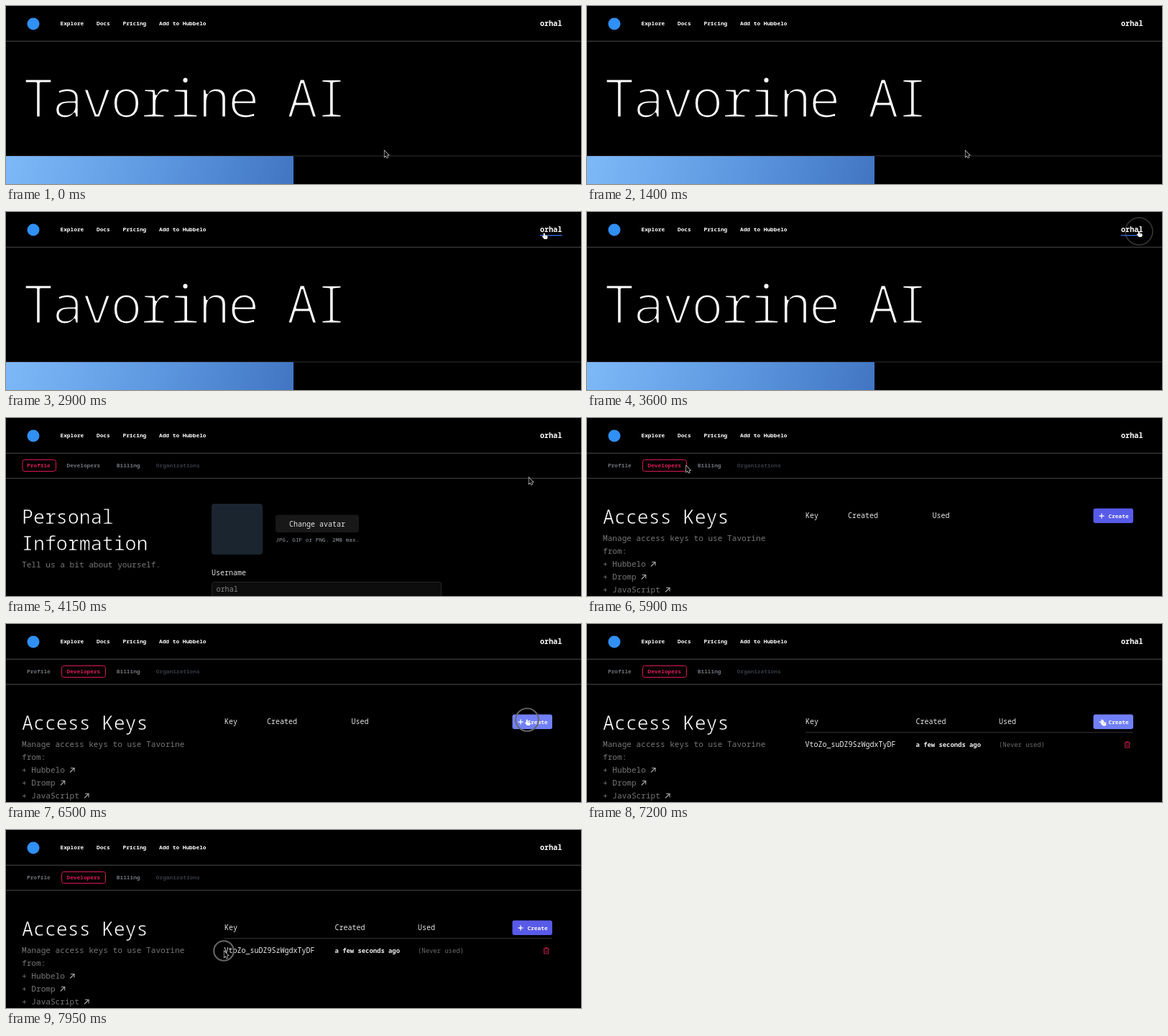
An HTML page with a canvas that plays this animation: 800x249 px, repeating every 8000 ms.

```html
<!DOCTYPE html>
<html lang="en">
<head>
<meta charset="utf-8">
<title>Access keys</title>
<style>
  html, body { margin: 0; width: 100%; height: 100%; overflow: hidden; background: #000; }
  canvas { display: block; width: 100%; height: 100%; }
</style>
</head>
<body>
<canvas id="stage"></canvas>
<script>
const W = 800, H = 249, LOOP = 8000;
const MONO = '"Noto Sans Mono", "DejaVu Sans Mono", monospace';
const USER = 'orhal', PRODUCT = 'Tavorine', CHAT = 'Hubbelo', TEAM = 'Dromp';
const PINK = '#dc1a5b', BLUE = '#3190f5', GRAY = '#777', PALE = '#e4e4e4';
const canvas = document.getElementById('stage');
const ctx = canvas.getContext('2d');

// When each state of the interface begins, in ms
const AT = {
  userHover: 2650, profile: 3800, avatar: 4350, devHover: 5350,
  developers: 5800, createHover: 6250, row: 6900, createLeave: 7300
};
// Pointer stops: time, x, y; it eases from one to the next
const PATH = [
  [0, 526, 202], [1920, 526, 202], [2600, 757, 18], [2850, 749, 30],
  [3000, 749, 30], [3250, 768, 27], [3750, 768, 27], [4100, 727, 83],
  [4700, 727, 83], [5400, 99, 62], [5820, 99, 62], [6350, 725, 134],
  [7150, 725, 134], [7800, 303, 169], [8000, 303, 169]
];
const CLICKS = [3400, 5580, 6380, 7880];

const clamp = v => Math.max(0, Math.min(1, v));
const ease = v => v * v * (3 - 2 * v);

const pointer = t => {
  let i = 0;
  while (i < PATH.length - 2 && t >= PATH[i + 1][0]) i++;
  const [t0, x0, y0] = PATH[i], [t1, x1, y1] = PATH[i + 1];
  const k = ease(clamp((t - t0) / (t1 - t0)));
  return [x0 + (x1 - x0) * k, y0 + (y1 - y0) * k];
};

const text = (str, x, y, size, color = '#fff', weight = 400, spacing = 0) => {
  ctx.font = `${weight} ${size}px ${MONO}`;
  ctx.letterSpacing = spacing + 'px';
  ctx.fillStyle = color;
  ctx.fillText(str, x, y);
};

// Stem width of the lightest face, per pixel of font size
const measureStem = () => {
  const probe = document.createElement('canvas');
  probe.width = probe.height = 200;
  const p = probe.getContext('2d');
  p.font = `100 200px ${MONO}`;
  p.fillText('I', 0, 160);
  const row = p.getImageData(0, 90, 200, 1).data;
  let sum = 0;
  for (let i = 3; i < row.length; i += 4) sum += row[i] / 255;
  return sum / 200;
};
const stem = measureStem();

// Light heading: trims the outline when the face is heavier than wanted
const heading = (str, x, y, size, wanted, spacing = 0) => {
  text(str, x, y, size, '#fff', 100, spacing);
  const extra = stem * size - wanted;
  if (extra > 0.1) {
    ctx.strokeStyle = '#000';
    ctx.lineWidth = extra;
    ctx.lineJoin = 'round';
    ctx.strokeText(str, x, y);
  }
};

const box = (x, y, w, h, r, fill, stroke) => {
  ctx.beginPath();
  ctx.roundRect(x, y, w, h, r);
  if (fill) { ctx.fillStyle = fill; ctx.fill(); }
  if (stroke) { ctx.strokeStyle = stroke; ctx.lineWidth = 1; ctx.stroke(); }
};

const rule = (x, y, w, color, h = 1) => {
  ctx.fillStyle = color;
  ctx.fillRect(x, y, w, h);
};

const dot = (x, y, r, color) => {
  ctx.fillStyle = color;
  ctx.beginPath();
  ctx.arc(x, y, r, 0, Math.PI * 2);
  ctx.fill();
};

const line = (points, color, width, close) => {
  ctx.beginPath();
  points.forEach(([x, y], i) => i ? ctx.lineTo(x, y) : ctx.moveTo(x, y));
  if (close) ctx.closePath();
  ctx.strokeStyle = color;
  ctx.lineWidth = width;
  ctx.lineJoin = 'miter';
  ctx.stroke();
};

const header = t => {
  dot(38, 25, 8.5, BLUE);
  text('Explore', 75.5, 27, 7.8, '#fff', 600);
  text('Docs', 126, 27, 7.8, '#fff', 600);
  text('Pricing', 162.5, 27, 7.8, '#fff', 600);
  text('Add to ' + CHAT, 213, 27, 7.8, '#fff', 600);
  text(USER, 743, 28, 10.2, '#fff', 700);
  if (t >= AT.userHover && t < AT.profile) rule(743, 32, 30.5, '#2f62d9', 1.5);
  rule(0, 48.7, W, '#4c4c4c');
};

const home = () => {
  heading(PRODUCT + ' AI', 22.8, 156, 74, 3.5, -3.6);
  rule(0, 209.3, W, '#303030');
  const g = ctx.createLinearGradient(20, 180, 400, 300);
  g.addColorStop(0, '#7cb8f7');
  g.addColorStop(0.5, '#5c97df');
  g.addColorStop(1, '#3f72c0');
  rule(0, 210, 400, g, 39);
};

const tabs = t => {
  const dev = t >= AT.developers;
  const hover = t >= AT.devHover;
  const idle = '#6f7479';
  if (dev) box(77.5, 58.5, 61, 16, 3, null, PINK);
  else box(23, 58.5, 46.5, 16, 3, null, PINK);
  text('Profile', 29, 69, 7.8, dev ? idle : PINK, 600);
  text('Developers', 84.5, 69, 7.8, hover ? PINK : idle, 600);
  text('Billing', 153.8, 69, 7.8, idle, 600);
  text('Organizations', 208.8, 69, 7.8, '#343b43', 600);
  rule(0, 83.8, W, '#474747');
};

const profile = t => {
  heading('Personal', 22, 148, 26.6, 1.8);
  heading('Information', 22, 184.5, 26.6, 1.8);
  text('Tell us a bit about yourself.', 22, 208.5, 11.1, GRAY, 300);
  box(286, 120, 71, 71, 4, '#1a2530');
  if (t >= AT.avatar) dot(321.5, 156.5, 18.5, BLUE);
  box(375, 135.5, 116, 24.5, 3, '#181818');
  text('Change avatar', 394, 151.5, 10, PALE);
  text('JPG, GIF or PNG. 2MB max.', 375, 173, 7.75, '#9299a1', 500);
  text('Username', 286, 220, 10, PALE);
  box(286.5, 229.5, 319, 30, 3, '#0d0d0d', '#242424');
  text(USER, 292.5, 243, 10.1, '#858585');
};

const linkItem = (label, y) => {
  const str = '+ ' + label + ' ';
  text(str, 22, y, 11.1, GRAY, 300);
  const x = 22 + ctx.measureText(str).width;
  line([[x + 0.5, y - 0.5], [x + 6.5, y - 6.5]], '#aaa', 1.1);
  line([[x + 1.5, y - 6.5], [x + 6.5, y - 6.5], [x + 6.5, y - 1.5]], '#aaa', 1.1);
};

const trash = (x, y) => {
  const red = '#b51f45';
  line([[x - 4, y - 3], [x + 4, y - 3]], red, 1.1);
  line([[x - 1.5, y - 3], [x - 1.5, y - 4.5], [x + 1.5, y - 4.5], [x + 1.5, y - 3]], red, 0.9);
  line([[x - 3, y - 3], [x - 3, y + 4], [x + 3, y + 4], [x + 3, y - 3]], red, 1.1);
  for (const dx of [-1, 1]) line([[x + dx, y - 1], [x + dx, y + 2.5]], red, 0.8);
};

const developers = t => {
  const row = t >= AT.row;
  const hot = t >= AT.createHover && t < AT.createLeave;
  heading('Access Keys', 22, 148, 26.6, 1.8);
  text('Manage access keys to use ' + PRODUCT, 22, 172, 11.1, GRAY, 300);
  text('from:', 22, 190, 11.1, GRAY, 300);
  [CHAT, TEAM, 'JavaScript'].forEach((label, i) => linkItem(label, 208 + 18 * i));

  text('Key', 304, 140, 10, PALE);
  text('Created', row ? 457.5 : 363, 140, 10, PALE);
  text('Used', row ? 573 : 480.5, 140, 10, PALE);
  box(704.5, 126.5, 55.5, 20.5, 3, hot ? '#7180f7' : '#585be8');
  line([[712.5, 137], [719.5, 137]], '#fff', 1.3);
  line([[716, 133.5], [716, 140.5]], '#fff', 1.3);
  text('Create', 725.5, 139.5, 7.8, '#fff', 700);

  if (!row) return;
  rule(304, 151, 456, '#303030');
  text('VtoZo_suDZ9SzWgdxTyDF', 303.5, 172.3, 10, '#eee');
  text('a few seconds ago', 457.5, 172, 8.9, '#eee', 600);
  text('(Never used)', 573, 172, 8.9, '#6c6c6c');
  trash(751.7, 169);
};

const ring = (t, x, y) => {
  for (const start of CLICKS) {
    const k = (t - start) / 260;
    if (k < 0 || k > 1) continue;
    ctx.globalAlpha = k < 0.6 ? 1 : (1 - k) / 0.4;
    ctx.beginPath();
    ctx.arc(x, y, 10.5 + 13 * k * (1 - k * 0.2), 0, Math.PI * 2);
    ctx.strokeStyle = '#66666a';
    ctx.lineWidth = 2.4 - 1.2 * k;
    ctx.stroke();
    ctx.globalAlpha = 1;
  }
};

const arrow = (x, y) => {
  const shape = [[0, 0], [0, 8.6], [2, 6.8], [3.4, 9.8], [4.8, 9.2], [3.5, 6.3], [6, 6.1]]
    .map(([dx, dy]) => [x + 0.5 + dx, y + 0.5 + dy]);
  line(shape, '#e8e8e8', 1.2, true);
  ctx.fillStyle = '#000';
  ctx.fill();
};

const hand = (x, y) => {
  box(x - 1.2, y - 0.5, 1.9, 6, 0.9, '#fff');
  box(x - 1.2, y + 2.4, 5.6, 5.6, 1.8, '#fff');
  line([[x - 2.6, y + 3.8], [x, y + 6.5]], '#fff', 1.6);
  for (const dx of [1.2, 2.8]) line([[x + dx, y + 3], [x + dx, y + 4.6]], '#555', 0.5);
};

const cursor = t => {
  const [x, y] = pointer(t);
  const over = (t >= AT.userHover && t < AT.profile) ||
    (t >= AT.devHover && t < AT.developers + 60) ||
    (t >= AT.createHover && t < AT.createLeave);
  ring(t, x, y);
  if (over) hand(x, y);
  else arrow(x, y);
};

const resize = () => {
  const dpr = window.devicePixelRatio || 1;
  canvas.width = Math.round(innerWidth * dpr);
  canvas.height = Math.round(innerHeight * dpr);
};

const draw = t => {
  ctx.setTransform(canvas.width / W, 0, 0, canvas.height / H, 0, 0);
  rule(0, 0, W, '#000', H);
  if (t < AT.profile) home();
  else {
    tabs(t);
    if (t < AT.developers) profile(t);
    else developers(t);
  }
  header(t);
  cursor(t);
};

let began;
const tick = now => {
  began ??= now;
  draw((now - began) % LOOP);
  requestAnimationFrame(tick);
};

addEventListener('resize', resize);
resize();
requestAnimationFrame(tick);
</script>
</body>
</html>
```
